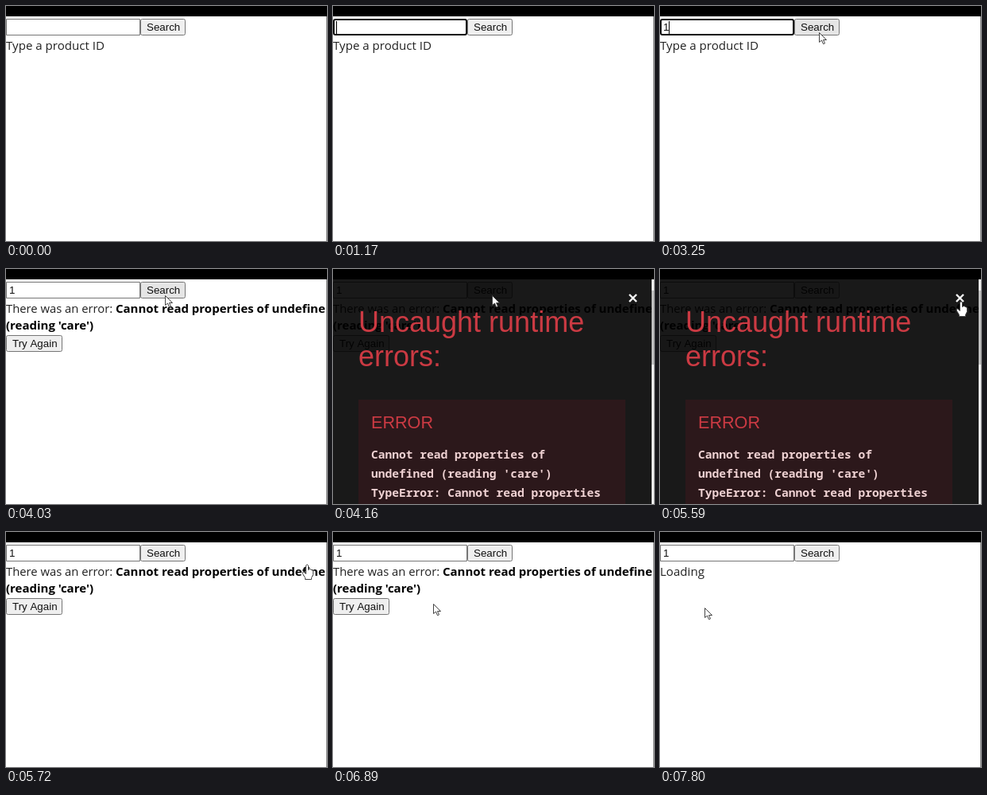
These frames come from a looping animation (404x295 px, 8000 ms). An HTML page with a canvas:

```html
<!DOCTYPE html>
<html lang="en">
<head>
<meta charset="utf-8">
<title>Product search</title>
<style>
  html, body { margin: 0; overflow: hidden; background: #fff; }
  canvas { display: block; }
</style>
</head>
<body>
<canvas id="stage" width="404" height="295"></canvas>
<script>
const ctx = document.getElementById('stage').getContext('2d');
const LOOP = 8000, STEP = 130;
const UI = '13.33px "Liberation Sans", Arial, sans-serif';
const BODY = '15.1px "Open Sans", sans-serif';
const BOLD = 'bold 15px "Open Sans", sans-serif';
const MONO = '600 14.6px "Noto Sans Mono", monospace';
const sans = size => `${size}px "Liberation Sans", Arial, sans-serif`;

// Pointer path: time, x, y
const path = [
  [130, 101, 143], [260, 98, 133], [390, 98, 133], [780, 60, 27],
  [2340, 40, 27], [2990, 200, 33], [4290, 200, 33], [5200, 379, 40],
  [5850, 379, 40], [6240, 235, 82], [6370, 235, 82], [7280, 56, 95]
];
const arrow = new Path2D('M0 0V12L3 9.5L5 14.2L7 13.4L5 9H9Z');
const hand = new Path2D('M-2 1.5Q-.5 -1 1 1.5V7L3 6L5 7L7 8V13L5 17V19H-3V17L-6 12Q-7 9 -5 9.5L-2 12Z');
const beam = new Path2D('M-2 -7H2M0 -7V7M-2 7H2');

function pointerAt(t) {
  const next = path.findIndex(key => key[0] > t);
  if (next < 0) return path[path.length - 1].slice(1);
  if (!next) return [-99, -99];
  const [t0, x0, y0] = path[next - 1], [t1, x1, y1] = path[next];
  const p = (t - t0) / (t1 - t0), e = p * p * (3 - 2 * p);
  return [Math.round(x0 + (x1 - x0) * e), Math.round(y0 + (y1 - y0) * e)];
}

function rect(x, y, w, h, color) {
  ctx.fillStyle = color;
  ctx.fillRect(x, y, w, h);
}

function text(str, x, y, font, color = '#222') {
  ctx.font = font;
  ctx.fillStyle = color;
  ctx.fillText(str, x, y);
}

function box(x, y, w, h, radius, fill, stroke, line = 1) {
  ctx.beginPath();
  ctx.roundRect(x + line / 2, y + line / 2, w - line, h - line, radius);
  ctx.fillStyle = fill;
  ctx.fill();
  ctx.lineWidth = line;
  ctx.strokeStyle = stroke;
  ctx.stroke();
}

function button(label, x, y, w, [px, py], pressed) {
  const hover = px >= x && px < x + w && py >= y && py < y + 21;
  box(x, y, w, 21, 2, pressed ? '#f5f5f5' : hover ? '#e5e5e5' : '#efefef', '#767676');
  text(label, x + 8, y + 15, UI, '#111');
}

function drawPage(t, pointer) {
  const focused = t >= 780 && t < 3380, typed = t >= 1950;
  box(0, 16, 169, 21, focused ? 2 : 0, '#fff', focused ? '#101010' : '#767676', focused ? 2 : 1);
  if (typed) text('1', 4, 31, UI, '#111');
  const caretOn = t < 1690 || typed && Math.floor((t - 1950) / 520) % 2 === 0;
  if (focused && caretOn) rect(typed ? 11 : 4, 19, 1, 16, '#000');
  button('Search', 169, 16, 57, pointer, t >= 3380 && t < 3510);

  if (t < 3510) text('Type a product ID', 0, 55, BODY);
  else if (t < 4030 || t >= 7800) text('Loading', 0, 55, BODY);
  else {
    text('There was an error: ', 0, 55, BODY.replace('15.1', '14.8'));
    text('Cannot read properties of undefined', 138, 55, BOLD, '#000');
    text("(reading 'care')", 0, 76, BOLD, '#000');
    button('Try Again', 0, 83, 71, pointer);
  }
  rect(402, 13, 2, 282, '#fff');
  rect(403, 13, 1, 282, '#8a8a8a');
}

function drawOverlay() {
  const red = '#cb3a43', pink = '#efd2d3';
  rect(0, 13, 401, 282, 'rgba(0,0,0,.9)');
  rect(401, 13, 3, 282, '#f1f1f1');
  rect(401, 27, 3, 93, '#c1c1c1');
  text('Uncaught runtime', 32, 79, sans(36), red);
  text('errors:', 32, 122, sans(36), red);
  rect(32, 164, 336, 131, '#2c181b');
  text('ERROR', 48, 200, sans(21.6), red);
  ['Cannot read properties of', "undefined (reading 'care')", 'TypeError: Cannot read properties']
    .forEach((line, i) => text(line, 48, 238 + 24 * i, MONO, pink));
  ctx.lineWidth = 2.4;
  ctx.strokeStyle = '#fff';
  ctx.stroke(new Path2D('M373 32L382 41M382 32L373 41'));
}

function drawPointer([x, y], overlay, t) {
  if (t >= 780 && t < 2470) return;
  const inField = !overlay && x < 169 && y > 16 && y < 37;
  const shape = inField ? beam : x > 366 ? hand : arrow;
  ctx.save();
  ctx.translate(x + .5, y + .5);
  ctx.lineWidth = 1;
  ctx.strokeStyle = '#444';
  ctx.fillStyle = '#fff';
  if (!inField) ctx.fill(shape);
  ctx.stroke(shape);
  ctx.restore();
}

function frame(now) {
  const t = Math.floor(now % LOOP / STEP) * STEP;
  const overlay = t >= 4160 && t < 5720;
  const pointer = pointerAt(t);
  rect(0, 0, 404, 295, '#fff');
  rect(0, 0, 404, 13, '#000');
  drawPage(t, pointer);
  if (overlay) drawOverlay();
  drawPointer(pointer, overlay, t);
  requestAnimationFrame(() => frame(performance.now() - start));
}

const start = performance.now();
frame(0);
</script>
</body>
</html>
```
